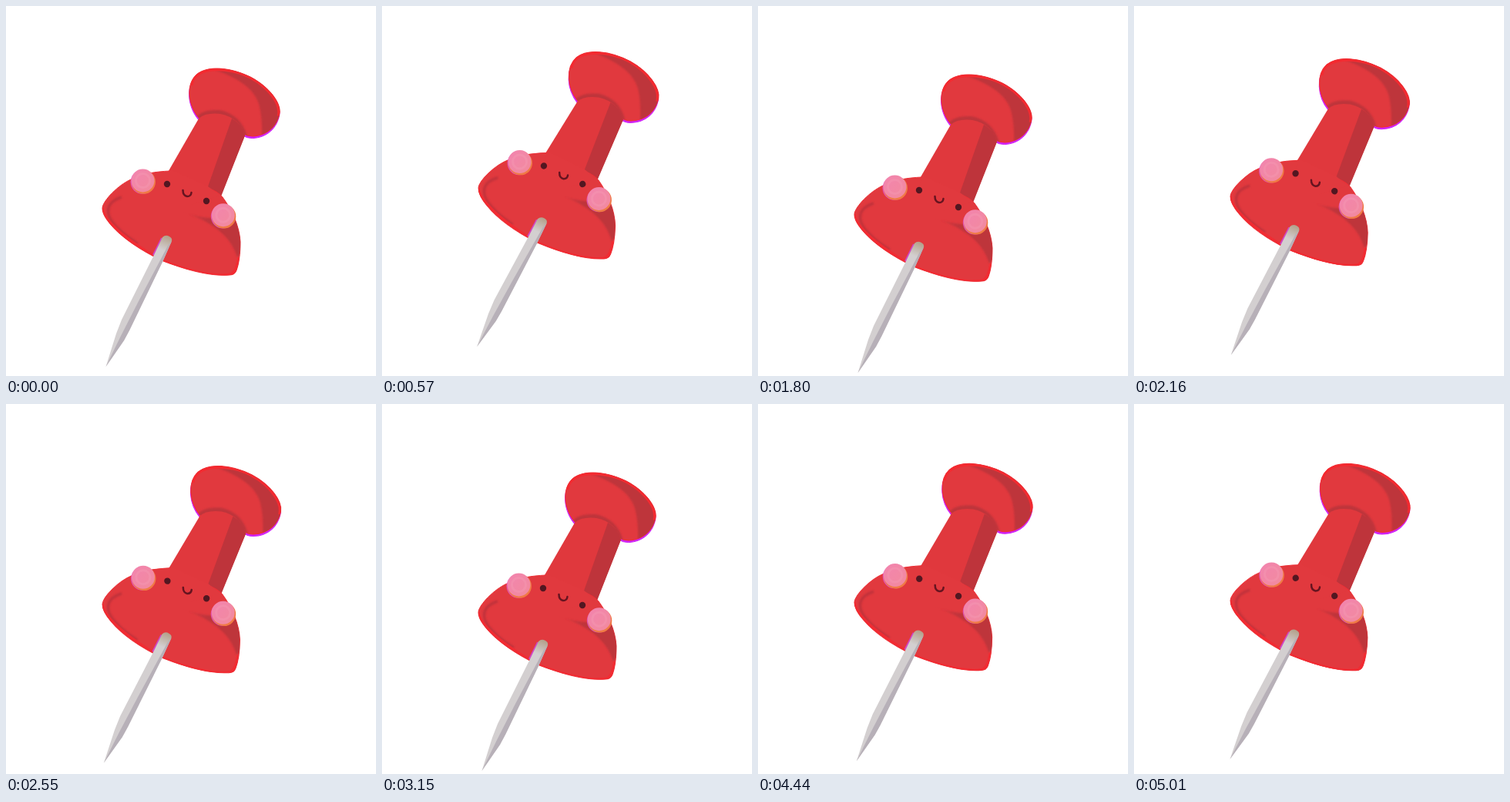
Recreate the animation shown at these times as an HTML page. Size 480 by 480 pixels, loop 5.04 s.

```html
<!DOCTYPE html>
<html lang="en">
<head>
<meta charset="utf-8">
<title>Hopping push pin</title>
<style>
html, body { margin: 0; width: 100%; height: 100%; overflow: hidden; background: #fff; }
svg { display: block; width: 100%; height: 100%; }
</style>
</head>
<body>
<svg viewBox="0 0 480 480">
  <defs>
    <path id="head" d="M250 145C236 128 233 102 247 89C261 77 290 79 317 92C342 105 357 126 355 139C352 155 340 168 320 169Q312 169 307 165Z"/>
    <path id="base" d="M125 262C126 252 146 232 162 225C178 217 194 215 212 214L262 236C270 239 277 243 281 248C293 264 303 286 304 306C304 322 302 335 299 343Q297 349 290 349C264 351 233 342 204 331C174 317 150 300 137 285C129 276 125 269 125 262Z"/>
    <clipPath id="inHead"><use href="#head"/></clipPath>
    <clipPath id="inBase"><use href="#base"/></clipPath>
    <linearGradient id="side" gradientUnits="userSpaceOnUse" x1="228" y1="262" x2="262" y2="278">
      <stop stop-color="#be343b" stop-opacity="0"/>
      <stop offset="1" stop-color="#be343b"/>
    </linearGradient>
    <linearGradient id="metal" gradientUnits="userSpaceOnUse" x1="209" y1="298" x2="202" y2="316">
      <stop stop-color="#b3a08a"/>
      <stop offset="1" stop-color="#d3cfd0"/>
    </linearGradient>
    <linearGradient id="blush" x1=".15" y1=".2" x2=".9" y2=".9">
      <stop stop-color="#f285ac"/>
      <stop offset="1" stop-color="#f28a9f"/>
    </linearGradient>
    <filter id="soft" x="-20%" y="-20%" width="140%" height="140%"><feGaussianBlur stdDeviation="1"/></filter>
    <g id="cheek">
      <circle cx="-.5" cy="1" r="15.500" fill="#e45bd0" opacity=".8"/>
      <circle cx="1" cy="1" r="15.500" fill="#f07a45"/>
      <circle cy="-.8" r="15" fill="url(#blush)"/>
      <circle cy="-.8" r="9" fill="none" stroke="#f59cb3" stroke-width="3" opacity=".4"/>
    </g>
  </defs>
  <g id="pin">
    <use href="#head" fill="#cf23f5" stroke="#cf23f5" transform="translate(-.3 2.6)"/>
    <use href="#head" fill="#e1393e" stroke="#f32a30"/>
    <g clip-path="url(#inHead)">
      <path d="M268 82C302 93 322 108 328 127Q333 145 332 172L365 165V120L320 86Z" fill="#be343b" filter="url(#soft)"/>
      <path d="M247 144Q255 134 277 135Q306 141 313 170L302 172Z" fill="#be343b" filter="url(#soft)"/>
      <path d="M240 103C242 78 286 76 317 92C343 106 358 128 354 143" fill="none" stroke="#f32a30" stroke-width="5"/>
    </g>
    <path d="M250 146Q259 138 278 140Q303 145 310 168L279 246L240 256L204 226Z" fill="#e0383d"/>
    <path d="M293 146Q306 153 310 168L279 247L261 237Z" fill="#be343b"/>
    <use href="#base" fill="#e1393e" stroke="#ee2f36"/>
    <path d="M213 212L262 234L278 246L240 258L208 230Z" fill="#e1393e"/>
    <g clip-path="url(#inBase)">
      <path d="M224 266C256 275 290 292 300 326L309 315V284L296 272Q268 281 224 266Z" fill="url(#side)" filter="url(#soft)"/>
      <path d="M150 248C128 255 128 271 143 286Q154 298 171 308" fill="none" stroke="#c2333a" stroke-width="3.500" filter="url(#soft)"/>
      <path d="M125 262C125 276 151 302 204 331C242 346 276 352 293 348Q300 343 302 326" fill="none" stroke="#f12b32" stroke-width="4"/>
    </g>
    <path d="M202 301L191 323" stroke="#d044c8" stroke-width="2"/>
    <path d="M203 300Q207 296 212 299Q216 301 215 305L203 332L160 421L153 434L129.500 468L143 425L150 407L191 325Z" fill="url(#metal)"/>
    <path d="M215 305L203 332L160 421L153 434L129.500 468L149 428L173 381L210 311Z" fill="#b7b0b8"/>
    <use href="#cheek" x="177.500" y="227.300"/>
    <use href="#cheek" x="281.800" y="272"/>
    <g fill="#521721">
      <circle cx="209" cy="231" r="4.200"/>
      <circle cx="260" cy="253" r="4.200"/>
    </g>
    <path d="M229.500 239Q229.500 246 235 247Q240 247 240.500 242" fill="none" stroke="#661420" stroke-width="2.500" stroke-linecap="round"/>
  </g>
</svg>
<script>
const LOOP = 5040, CYCLE = 1350, STEP = 30;
const pin = document.getElementById("pin");

// start, end, height at start, at top and at end, greatest tilt in degrees
const hops = [
  [0, 405, 0, -65, 6, 3.2],
  [463, 863, 8, -32, 2, 2.25],
  [894, 1230, 2, -9.2, 2.5, 2.2]
];
// resting heights between hops
const rests = [[405, 450, 6, 8], [450, 463, 8, 8], [863, 894, 2, 2], [1230, 1350, 2.5, 0]];

function pose(t) {
  for (const [a, b, y0, top, y1, tilt] of hops) {
    if (t < a || t >= b) continue;
    const u = (2 * t - a - b) / (b - a);
    return [top + ((u < 0 ? y0 : y1) - top) * u * u, tilt * (1 - u * u)];
  }
  const [a, b, y0, y1] = rests.find(r => t >= r[0] && t < r[1]);
  return [y0 + (y1 - y0) * (t - a) / (b - a), 0];
}

function draw() {
  const t = Math.floor(performance.now() % LOOP / STEP) * STEP;
  const [y, tilt] = pose(t % CYCLE);
  pin.setAttribute("transform", `translate(0 ${y}) rotate(${tilt} 215 262)`);
  requestAnimationFrame(draw);
}
draw();
</script>
</body>
</html>
```
